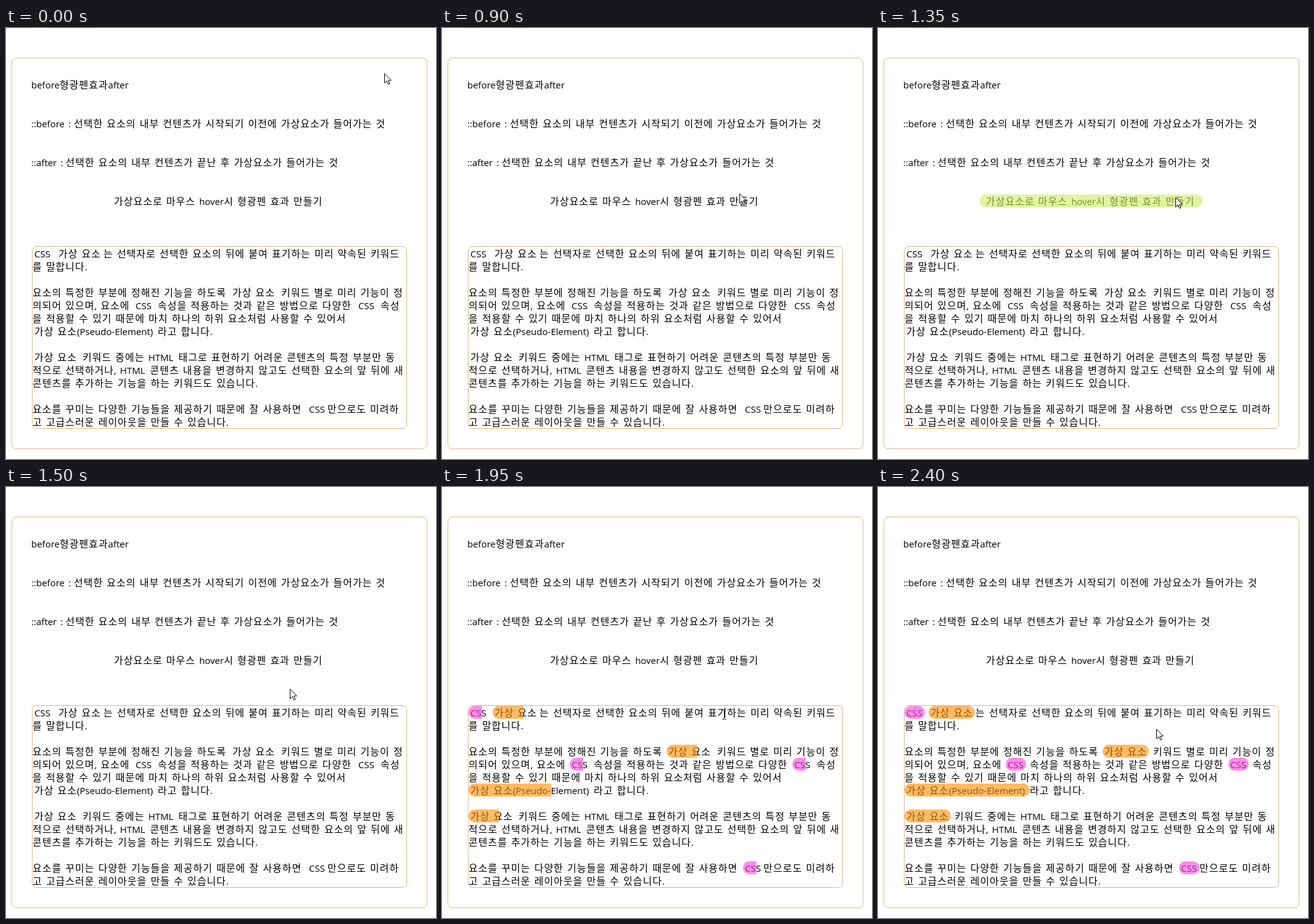
Recreate the animation shown at these times as an HTML page. Size 697 by 699 pixels, loop 2.55 s.

```html
<!DOCTYPE html>
<html lang="ko">
<head>
<meta charset="utf-8">
<title>형광펜 효과</title>
<style>
  html, body { margin: 0; width: 100%; height: 100%; overflow: hidden; background: #fff; }
  svg { display: block; }
  text {
    font: 350 16px "Noto Sans CJK KR", "Noto Sans CJK", "Noto Sans CJK JP", sans-serif;
    letter-spacing: 1px;
    word-spacing: .7px;
    white-space: pre;
  }
  .latin { font: 15px "Open Sans", "Noto Sans", sans-serif; letter-spacing: 0; }
  .frame { fill: none; stroke: burlywood; }
  .pill { opacity: .6; }
</style>
</head>
<body>
<svg id="stage" width="697" height="699" viewBox="0 0 697 699">
  <rect class="frame" x="9.5" y="48.5" width="673" height="634" rx="7.5"/>
  <rect class="frame" x="42.5" y="354.5" width="607" height="295" rx="7.5"/>
  <g id="copy"></g>
  <g id="marks"></g>
  <path id="arrow" fill="#fff" stroke="#000"
        d="M.5 .8V16.3L4.2 12.8L6.7 18.4L9 17.4L6.6 12H11.4Z"/>
  <path id="beam" fill="none" stroke="#000" d="M.5 .5h2.5M4 .5h2.5M3.5 1v14M.5 15.5h2.5M4 15.5h2.5"/>
</svg>
<script>
const STEP = 150, LOOP = 2550, LINE = 21, ASCENT = 17;
const BODY_TOP = 355, TITLE_TOP = 270;
const $ = id => document.getElementById(id);

function add(parent, tag, attrs, content) {
  const el = document.createElementNS("http://www.w3.org/2000/svg", tag);
  for (const key in attrs) el.setAttribute(key, attrs[key]);
  if (content) el.textContent = content;
  parent.append(el);
  return el;
}

// Latin runs get their own face; spaces stay with the Hangul face.
function write(x, top, string) {
  const text = add($("copy"), "text", { x, y: top + ASCENT });
  for (const run of string.match(/[!-~]+|[^!-~]+/g))
    add(text, "tspan", /[!-~]/.test(run) ? { class: "latin" } : {}, run);
}

function pill(x, top, width, fill) {
  return add($("marks"), "rect", { class: "pill", x, y: top, width, height: LINE, rx: 10, fill });
}

const bodyTop = row => BODY_TOP + row * LINE;

[
  [41, 81, "before형광펜효과after"],
  [41, 144, "::before :"],
  [110, 144, "선택한 요소의 내부 컨텐츠가 시작되기 이전에 가상요소가 들어가는 것"],
  [41, 207, "::after :"],
  [96.5, 207, "선택한 요소의 내부 컨텐츠가 끝난 후 가상요소가 들어가는 것"],
  [175, TITLE_TOP, "가상요소로 마우스 hover시 형광펜 효과 만들기"]
].forEach(line => write(...line));

[
  [158, 0, "는 선택자로 선택한 요소의 뒤에 붙여 표기하는 미리 약속된 키워드"],
  [43, 1, "를 말합니다."],
  [43, 3, "요소의 특정한 부분에 정해진 기능을 하도록"],
  [446, 3, "키워드 별로 미리 기능이 정"],
  [43, 4, "의되어 있으며, 요소에"],
  [246, 4, "속성을 적용하는 것과 같은 방법으로 다양한"],
  [607, 4, "속성"],
  [43, 5, "을 적용할 수 있기 때문에 마치 하나의 하위 요소처럼 사용할 수 있어서"],
  [246, 6, "라고 합니다."],
  [124, 8, "키워드 중에는 HTML"],
  [279.5, 8, "태그로 표현하기 어려운 콘텐츠의 특정 부분만 동"],
  [43, 9, "적으로 선택하거나, HTML"],
  [233.5, 9, "콘텐츠 내용을 변경하지 않고도 선택한 요소의 앞 뒤에 새"],
  [43, 10, "콘텐츠를 추가하는 기능을 하는 키워드도 있습니다."],
  [43, 12, "요소를 꾸미는 다양한 기능들을 제공하기 때문에 잘 사용하면"],
  [521, 12, "만으로도 미려하"],
  [43, 13, "고 고급스러운 레이아웃을 만들 수 있습니다."]
].forEach(([x, row, string]) => write(x, bodyTop(row), string));

const ORANGE = "rgb(255,140,0)", PINK = "rgb(255,65,220)", LIME = "rgb(208,237,97)";

function keyword(x, row, width, fill, string) {
  write(x + 3, bodyTop(row), string);
  return pill(x, bodyTop(row), width, fill);
}

const keywords = [
  ...[[43, 0], [207, 4], [568, 4], [488, 12]].map(([x, row]) => keyword(x, row, 33, PINK, "CSS")),
  ...[[82, 0], [364, 3], [43, 8]].map(([x, row]) => keyword(x, row, 75, ORANGE, "가상 요소")),
  keyword(43, 6, 203, ORANGE, "가상 요소(Pseudo-Element)")
];
const title = pill(165, TITLE_TOP, 361, LIME);

// Cursor corner per step; a third entry selects the text cursor.
const cursor = [
  [613, 73], [562, 142], [543, 167], [518, 202, 1], [488, 253], [483, 255],
  [482, 268], [482, 267], [482, 274], [482, 274], [460, 327], [458, 346],
  [455, 355, 1], [454, 361, 1], [454, 377], [452, 386], [451, 392]
];
const titleFill = { 7: .468, 8: .911, 9: 1 };
const keywordFill = { 12: .145, 13: .66, 14: .875, 15: .975, 16: 1 };

function reveal(el, part = 0) {
  el.style.display = part ? "" : "none";
  el.style.clipPath = `inset(0 ${(1 - part) * 100}% 0 0)`;
}

function show(step) {
  const [x, y, isBeam] = cursor[step];
  for (const [id, visible] of [["arrow", !isBeam], ["beam", isBeam]]) {
    $(id).style.display = visible ? "" : "none";
    $(id).setAttribute("transform", `translate(${x} ${y})`);
  }
  reveal(title, titleFill[step]);
  keywords.forEach(el => reveal(el, keywordFill[step]));
}

const start = performance.now();
function tick() {
  show(Math.floor((performance.now() - start) % LOOP / STEP));
  requestAnimationFrame(tick);
}
tick();
</script>
</body>
</html>
```
